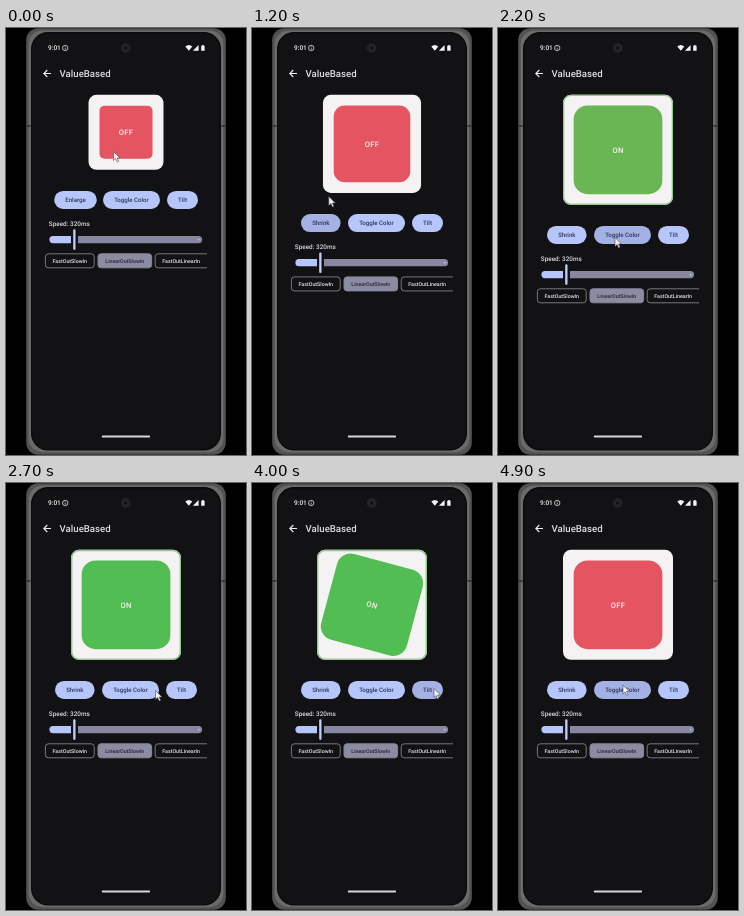
An HTML page for the animation above (5 s loop, 240 px wide and 427 px high).

```html
<!DOCTYPE html>
<html lang="en">
<head>
<meta charset="utf-8">
<title>Value based animation</title>
<style>
  html, body { margin: 0; width: 100%; height: 100%; overflow: hidden; background: #000; }
  svg { display: block; width: 100vw; height: 100vh; }
  text { font-family: Roboto, "Noto Sans", sans-serif; text-rendering: geometricPrecision; }
  .mid { text-anchor: middle; }
  .btn text { font-size: 6.1px; font-weight: 500; fill: #2c375c; }
  .chip text { font-size: 5.3px; font-weight: 500; fill: #e6e5e9; }
  .chip rect { fill: none; stroke: #77777c; stroke-width: 1; }
  .chip.on rect { fill: #8b8ba1; stroke: #86869b; }
  .chip.on text { fill: #23242f; }
</style>
</head>
<body>
<svg viewBox="0 0 240 427" preserveAspectRatio="none">
  <defs>
    <clipPath id="row"><rect x="38" y="220" width="163" height="26"/></clipPath>
    <filter id="soft" x="-5%" y="-5%" width="110%" height="110%"><feGaussianBlur stdDeviation=".7"/></filter>
  </defs>
  <rect width="240" height="427" fill="#000"/>

  <!-- phone body -->
  <g filter="url(#soft)">
    <rect x="20.2" y=".3" width="199.6" height="426.4" rx="12" fill="#525252"/>
    <rect x="22.6" y="2.4" width="194.8" height="421.8" rx="14" fill="#6a6a6a"/>
    <rect x="25" y="4" width="190" height="418.6" rx="17" fill="#0a0a0b"/>
    <path d="M20.5 98h4M215.5 98h4" stroke="#2c2c2c" stroke-width="1.4"/>
  </g>
  <rect x="26.2" y="5.4" width="187.6" height="415.8" rx="16" fill="#121214"/>
  <circle cx="119.7" cy="20" r="5" fill="#222224"/>
  <circle cx="119.7" cy="20" r="2.2" fill="#101012" stroke="#37373b" stroke-width=".6"/>

  <!-- status bar -->
  <text x="42" y="22.4" font-size="6.5" font-weight="500" fill="#f2f2f2">9:01</text>
  <g fill="none" stroke="#dedede" stroke-width=".8">
    <circle cx="59.2" cy="20" r="2.7"/>
    <path d="M59.2 18.4v.8M59.2 19.8v1.8"/>
  </g>
  <path d="M179.3 18.6q3.5-3 7 0l-3.5 4.1zM192.6 17v5.7h-5.7zM195.2 17.7h.9v-.8h1.6v.8h.9v5h-3.4z" fill="#f4f4f4"/>

  <!-- title bar -->
  <path d="M45 45.5h-7.2M41.3 42l-3.5 3.5 3.5 3.5" fill="none" stroke="#eeeef0" stroke-width="1.1"/>
  <text x="53.6" y="48.8" font-size="9.65" font-weight="500" fill="#dddce0">ValueBased</text>

  <!-- card -->
  <rect id="card" rx="8" fill="#f4f2f2"/>
  <rect id="edge" fill="none" stroke="#8fcb8c"/>
  <g id="tile">
    <rect id="face"/>
    <text id="state" class="mid" y="2.7" font-size="7.6" font-weight="500" letter-spacing=".3" fill="#fbf0f0"></text>
  </g>

  <!-- controls -->
  <g id="panel">
    <g id="buttons"></g>
    <text x="42.8" y="197.6" font-size="6.4" font-weight="500" fill="#dcdbdf">Speed: 320ms</text>
    <path d="M65 208h-18a3.6 3.6 0 0 0 0 7.2h18z" fill="#b6c5fb"/>
    <path d="M72 208h120.5a3.6 3.6 0 0 1 0 7.2h-120.5z" fill="#8788a0"/>
    <circle cx="192.7" cy="211.6" r=".9" fill="#b6c5fb"/>
    <rect x="67.2" y="201.3" width="2.3" height="20.6" rx="1.1" fill="#c2cefc"/>
    <g id="chips" clip-path="url(#row)"></g>
  </g>

  <rect x="95.7" y="407.4" width="48.4" height="2" rx="1" fill="#d6d6d8"/>
  <path id="cursor" d="M0 0v9l2.1-1.9 1.5 3.3 1.5-.7-1.5-3.2h2.9z" fill="#f2f0f2" stroke="#4a4a52" stroke-width=".6" stroke-linejoin="round"/>
</svg>
<script>
const LOOP = 5000, STEP = 100, SPEED = 320, TOP = 66.8;
const ENLARGE = 1100, ON = 2000, TILT = 3335, UNTILT = 4000, OFF = 4600;
const ANGLE = 15, RED = "rgb(229 85 97)", GREEN = "rgb(82 189 82)";
const IDLE = "rgb(182 197 251)", PRESSED = "rgb(163 177 228)";

// time, x, y of the pointer tip
const POINTER = [
  [0, 107.5, 123.5], [600, 76.8, 168.5], [1250, 76.8, 168.5], [1400, 108, 191],
  [1600, 117, 209.5], [2500, 117, 209.5], [2900, 182, 205.5], [4200, 182, 205.5],
  [4500, 124, 205.5], [4700, 124, 205.5], [4900, 125, 202]
];
// x and width of the three buttons
const LAYOUT = {
  small: [[48.2, 42.6], [97, 57], [161, 31]],
  large: [[49, 39.6], [96, 57], [160, 31]],
  tilted: [[46.8, 39.8], [92, 56.6], [154, 39.2]]
};
// button index, hover start, hover end
const HOVER = [[0, 600, 1500], [1, 1550, 2700], [2, 2800, 4350], [1, 4500, 5200]];
// name, x, width
const CHIPS = [["FastOutSlowIn", 39.4, 48.8], ["LinearOutSlowIn", 92, 53.6], ["FastOutLinearIn", 149.2, 51.8]];

const $ = id => document.getElementById(id);
const clamp = v => Math.min(1, Math.max(0, v));
const mix = (a, b, p) => a + (b - a) * p;
const blend = (a, b, p) => `color-mix(in oklab, ${a}, ${b} ${(p * 100).toFixed(2)}%)`;
const set = (el, attrs) => { for (const k in attrs) el.setAttribute(k, attrs[k]); return el; };
const add = (parent, tag, attrs) =>
  parent.appendChild(set(document.createElementNS("http://www.w3.org/2000/svg", tag), attrs));

// cubic-bezier(0, 0, 0.2, 1)
function slowIn(x) {
  if (x <= 0 || x >= 1) return clamp(x);
  let lo = 0, hi = 1;
  for (let i = 0; i < 24; i++) {
    const s = (lo + hi) / 2;
    if (.6 * (1 - s) * s * s + s ** 3 < x) lo = s; else hi = s;
  }
  return 3 * (1 - lo) * lo * lo + lo ** 3;
}
const tween = (t, start) => slowIn((t - start) / SPEED);

function pointerAt(t) {
  const i = POINTER.findIndex(k => k[0] > t);
  if (i < 0) return POINTER[POINTER.length - 1].slice(1);
  const a = POINTER[i - 1], b = POINTER[i];
  const p = (t - a[0]) / (b[0] - a[0]), e = p * p * (3 - 2 * p);
  return [mix(a[1], b[1], e), mix(a[2], b[2], e)];
}

const buttons = [0, 1, 2].map(() => {
  const g = add($("buttons"), "g", { class: "btn" });
  return {
    box: add(g, "rect", { y: 162.9, height: 18, rx: 9 }),
    label: add(g, "text", { y: 174, class: "mid" })
  };
});
CHIPS.forEach(([name, x, w], i) => {
  const g = add($("chips"), "g", { class: i === 1 ? "chip on" : "chip" });
  // the last chip runs on past the edge of the row
  add(g, "rect", { x, y: 225.8, width: i === 2 ? w + 8 : w, height: 14, rx: 3 });
  add(g, "text", { x: x + w / 2, y: 234.7, class: "mid" }).textContent = name;
});

function drawButtons(t) {
  const large = t >= ENLARGE, tilted = t >= TILT && t < UNTILT;
  const names = [large ? "Shrink" : "Enlarge", "Toggle Color", tilted ? "Un-tilt" : "Tilt"];
  const spots = LAYOUT[tilted ? "tilted" : large ? "large" : "small"];
  buttons.forEach(({ box, label }, i) => {
    const [x, width] = spots[i];
    const tint = Math.max(0, ...HOVER.filter(h => h[0] === i)
      .map(([, a, b]) => Math.min(clamp((t - a) / 200), clamp((b - t) / 150))));
    set(box, { x, width }).style.fill = blend(IDLE, PRESSED, tint);
    set(label, { x: x + width / 2 }).textContent = names[i];
  });
}

function draw(t) {
  const grow = tween(t, ENLARGE);
  const green = tween(t, ON) - tween(t, OFF);
  const angle = ANGLE * (tween(t, TILT) - tween(t, UNTILT));
  const size = mix(75, 110, grow), inner = mix(53, 88.7, grow), line = 1.4 * green;

  set($("card"), { x: 120 - size / 2, y: TOP, width: size, height: size });
  set($("edge"), {
    x: 120 - size / 2 + line / 2, y: TOP + line / 2, rx: 8 - line / 2,
    width: size - line, height: size - line, "stroke-width": line
  });
  set($("face"), {
    x: -inner / 2, y: -inner / 2, width: inner, height: inner, rx: mix(5, 14, grow)
  }).style.fill = blend(RED, GREEN, green);
  set($("tile"), { transform: `translate(120 ${TOP + size / 2}) rotate(${angle})` });
  $("state").textContent = t >= ON && t < OFF ? "ON" : "OFF";
  set($("panel"), { transform: `translate(0 ${size - 75})` });
  drawButtons(t);
  set($("cursor"), { transform: `translate(${pointerAt(t)})` });
}

const begin = performance.now();
function tick() {
  const t = (performance.now() - begin) % LOOP;
  draw(Math.floor(t / STEP) * STEP);
  requestAnimationFrame(tick);
}
tick();
</script>
</body>
</html>
```
